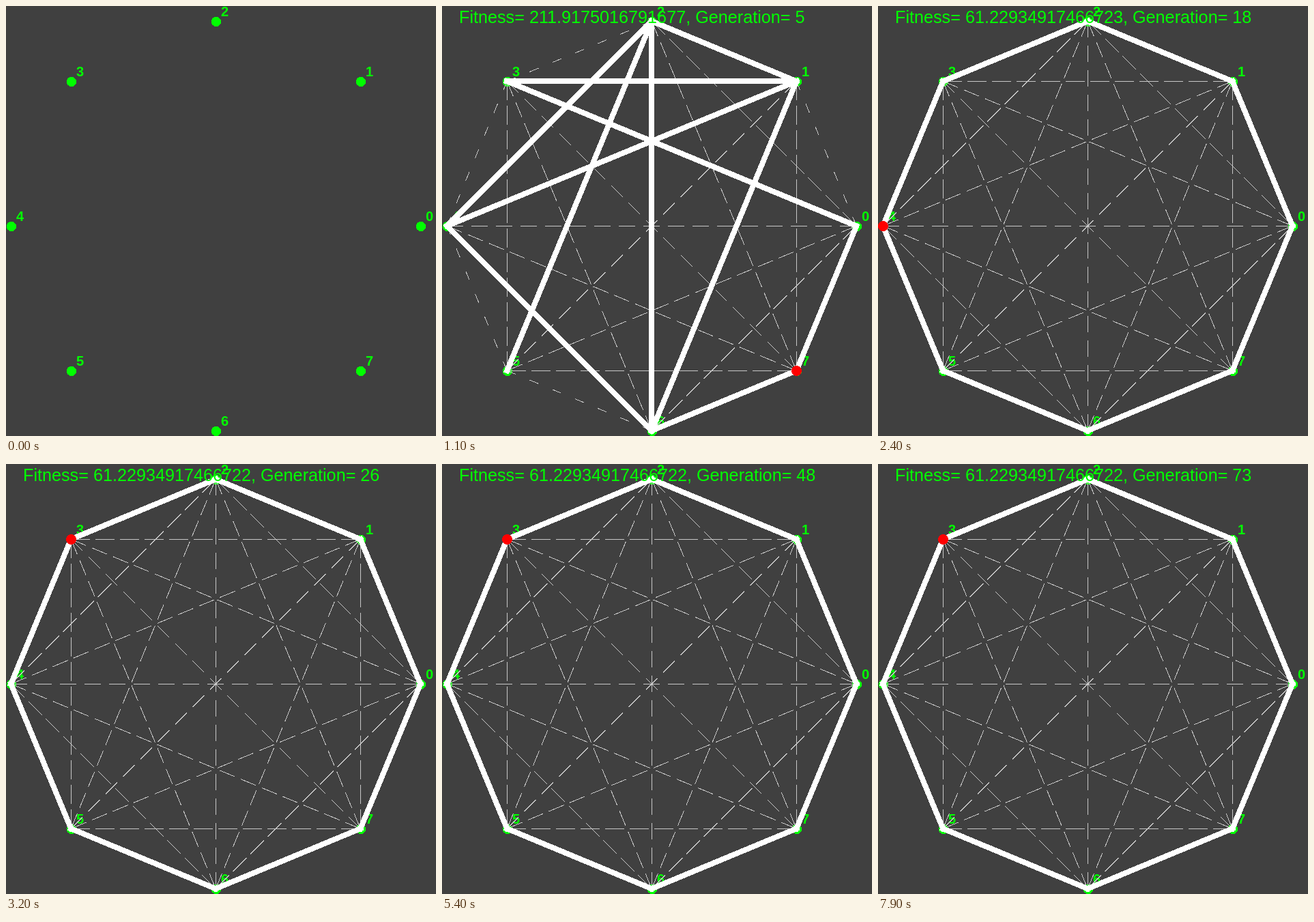
An HTML page that plays this animation: 630 px wide and 630 px high, repeating every 8 s.

```html
<!DOCTYPE html>
<html lang="en">
<head>
<meta charset="utf-8">
<title>Route search</title>
<style>
  html, body { margin: 0; width: 100%; height: 100%; overflow: hidden; background: #404040; }
  svg { display: block; width: 630px; height: 630px; }
  text { font-family: "Liberation Sans", Arial, sans-serif; fill: #0f0; white-space: pre; }
  circle, line, path { shape-rendering: crispEdges; }
  .label { font-size: 20px; font-weight: bold; }
  #status { font-size: 25.2px; }
  .node { fill: #0f0; }
  .edge { stroke: #c8c8c8; stroke-width: 1; }
  .route { fill: none; stroke: #fff; stroke-width: 8; stroke-linecap: square; }
  #start { fill: #f00; }
</style>
</head>
<body>
<svg viewBox="0 0 630 630">
  <g id="nodes"></g>
  <g id="edges"></g>
  <g id="routes"></g>
  <circle id="start" r="7.5"/>
  <text id="status" x="25" y="25"></text>
</svg>
<script>
const LOOP = 8000, EDGES_AT = 200, SEARCH_AT = 700, STEP = 100;
const RADIUS = 300, COUNT = 8;
// Lines sit a quarter pixel into the grid, so rising diagonals cover two pixels per row.
const LINE_SHIFT = 0.25;
const $ = id => document.getElementById(id);

function add(parent, tag, attrs, text = '') {
  const el = document.createElementNS('http://www.w3.org/2000/svg', tag);
  for (const key in attrs) el.setAttribute(key, attrs[key]);
  el.textContent = text;
  parent.appendChild(el);
  return el;
}

const cities = Array.from({ length: COUNT }, (_, i) => {
  const angle = i * 2 * Math.PI / COUNT;
  return {
    x: 307 + Math.round(RADIUS * Math.cos(angle)) + LINE_SHIFT,
    y: 322 - Math.round(RADIUS * Math.sin(angle)) + LINE_SHIFT
  };
});

// Each solution is a list of edges written as pairs of city digits.
const solutions = [
  { from: 1, start: 7, fitness: '211.9175016791677', edges: '21 31 30 41 42 46 25 26 16 07 76' },
  { from: 6, start: 6, fitness: '86.19540680001116', edges: '32 21 31 30 07 76 65 54 43' },
  { from: 15, start: 4, fitness: '61.22934917466723', edges: '01 12 23 34 45 56 67 70' },
  { from: 23, start: 3, fitness: '61.22934917466722', edges: '01 12 23 34 45 56 67 70' }
];

cities.forEach(({ x, y }, i) => {
  const cx = Math.ceil(x), cy = Math.ceil(y);
  add($('nodes'), 'circle', { class: 'node', cx, cy, r: 7.2 });
  add($('nodes'), 'text', { class: 'label', x: cx + 7, y: cy - 8 }, i);
});

// Dash length and number of periods for chords spanning 1 to 4 cities.
const dashes = [[14, 6], [28, 11], [24, 16], [24, 16]];
for (let i = 0; i < COUNT; i++) {
  for (let j = i + 1; j < COUNT; j++) {
    const span = Math.min(j - i, COUNT - j + i);
    const a = cities[i], b = cities[j];
    const [on, periods] = dashes[span - 1];
    const gap = (Math.hypot(b.x - a.x, b.y - a.y) - on) / periods - on;
    add($('edges'), 'line', {
      class: 'edge', x1: a.x, y1: a.y, x2: b.x, y2: b.y, 'stroke-dasharray': `${on} ${gap}`
    });
  }
}

for (const solution of solutions) {
  const d = solution.edges.split(' ').map(([a, b]) =>
    `M${cities[a].x} ${cities[a].y}L${cities[b].x} ${cities[b].y}`).join('');
  solution.path = add($('routes'), 'path', { class: 'route', d });
}

function show(el, visible) {
  el.setAttribute('visibility', visible ? 'visible' : 'hidden');
}

function render(time) {
  const t = time % LOOP;
  const generation = Math.floor((t - SEARCH_AT) / STEP) + 1;
  const best = solutions.filter(s => s.from <= generation).pop();
  show($('edges'), t >= EDGES_AT);
  for (const solution of solutions) show(solution.path, solution === best);
  show($('start'), best);
  show($('status'), best);
  if (!best) return;
  const { x, y } = cities[best.start];
  $('start').setAttribute('cx', x + LINE_SHIFT);
  $('start').setAttribute('cy', y + LINE_SHIFT);
  $('status').textContent = `Fitness= ${best.fitness}, Generation= ${generation}`;
}

const origin = performance.now();
function frame() {
  render(performance.now() - origin);
  requestAnimationFrame(frame);
}
frame();
</script>
</body>
</html>
```
